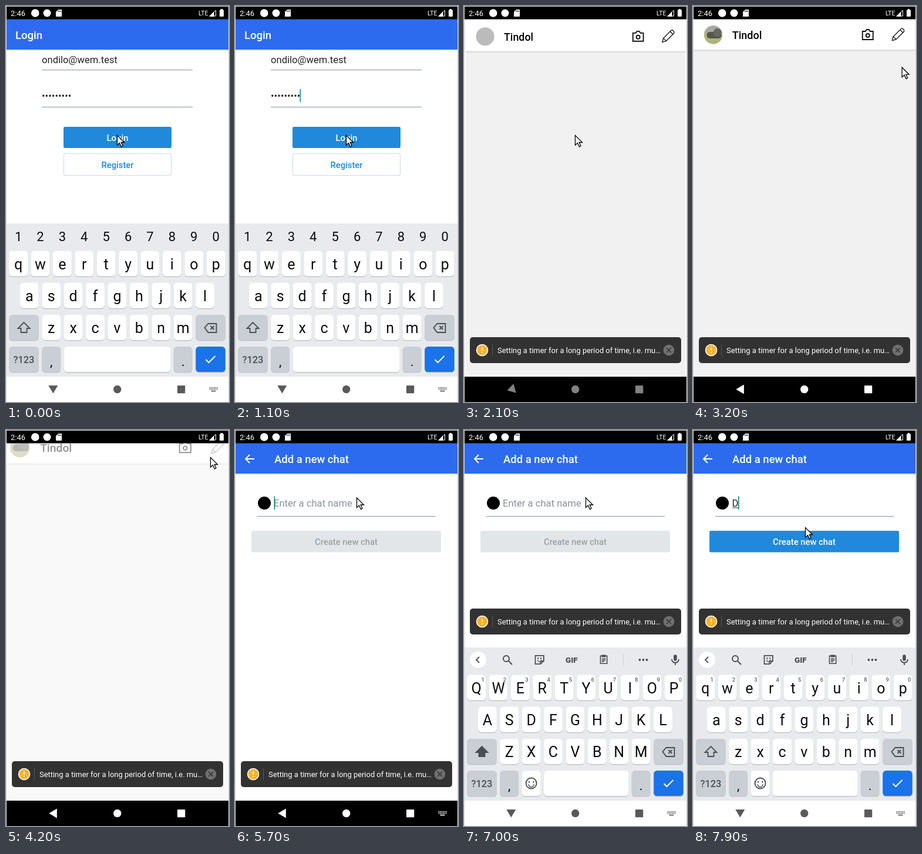
Write an HTML page with a canvas that moves like this. It is 380 px wide and 672 px high and loops after 8 s.

```html
<!DOCTYPE html>
<html lang="en">
<head>
<meta charset="utf-8">
<title>Chat app walkthrough</title>
<style>
html, body { margin: 0; width: 100%; height: 100%; overflow: hidden; background: #fff; }
canvas { display: block; }
</style>
</head>
<body>
<canvas id="stage" width="380" height="672"></canvas>
<script>
const W = 380, H = 672, LOOP = 8000, STEP = 100;
const TOP = 22, NAV = 629, MID_X = 190, MID_Y = 325;
const BLUE = '#2c6bed', BUTTON = '#2089dc', GREY = '#86939e', TEAL = '#17837c';
const TEXT = '#242424', INK = '#0c0c0d', KEY_INK = '#4a4d51', PANEL = '#e8eaed', GREY_KEY = '#caced5';
const DP = 380 / 411.4;
const stage = document.getElementById('stage').getContext('2d');
const layerCanvas = Object.assign(document.createElement('canvas'), { width: W, height: H });
const layer = layerCanvas.getContext('2d');
let ctx = stage;

const ramp = (t, from, to) => Math.min(1, Math.max(0, (t - from) / (to - from)));
const easeOut = k => 1 - (1 - k) ** 2;
const blink = t => (t + LOOP) % 1000 < 500;

function rect(x, y, w, h, color, radius = 0) {
  ctx.fillStyle = color;
  ctx.beginPath();
  ctx.roundRect(x, y, w, h, radius);
  ctx.fill();
}

function disc(x, y, r, color) {
  ctx.fillStyle = color;
  ctx.beginPath();
  ctx.arc(x, y, r, 0, Math.PI * 2);
  ctx.fill();
}

function text(str, x, y, size, color, weight = 400, align = 'left') {
  ctx.font = `${weight} ${size}px Roboto, sans-serif`;
  ctx.textAlign = align;
  ctx.fillStyle = color;
  ctx.fillText(str, x, y);
}

// Icons live on a 24 unit grid centred on (x, y).
function icon(path, x, y, color, { scale = 1, width = 2, fill, cap = 'butt' } = {}) {
  ctx.save();
  ctx.translate(x, y);
  ctx.scale(scale, scale);
  ctx.translate(-12, -12);
  const shape = new Path2D(path);
  if (fill) { ctx.fillStyle = fill; ctx.fill(shape); }
  ctx.strokeStyle = color;
  ctx.lineWidth = width;
  ctx.lineCap = cap;
  ctx.stroke(shape);
  ctx.restore();
}

function clipped(addPath, paint) {
  ctx.save();
  ctx.beginPath();
  addPath();
  ctx.clip();
  paint();
  ctx.restore();
}

function shadow(y, strength, depth) {
  const g = ctx.createLinearGradient(0, y, 0, y + depth);
  g.addColorStop(0, `rgba(0,0,0,${strength})`);
  g.addColorStop(1, 'rgba(0,0,0,0)');
  rect(0, y, W, depth, g);
}

// Paints a whole page scaled about the screen centre and faded as one group.
function blend(scale, alpha, paint) {
  if (!alpha) return;
  ctx = layer;
  ctx.clearRect(0, 0, W, H);
  ctx.save();
  ctx.translate(MID_X, MID_Y);
  ctx.scale(scale, scale);
  ctx.translate(-MID_X, -MID_Y);
  paint();
  ctx.restore();
  ctx = stage;
  ctx.globalAlpha = alpha;
  ctx.drawImage(layerCanvas, 0, 0);
  ctx.globalAlpha = 1;
}

function blueHeader(title, x) {
  rect(1, TOP, 378, NAV - TOP, '#fff');
  rect(1, TOP, 378, 52, BLUE);
  shadow(74, .14, 3);
  text(title, x, 56, 20 * DP, '#fff', 500);
}

function button(label, x, y, w, h, back, color) {
  rect(x, y, w, h, back, 2.5);
  text(label, x + w / 2, y + 24, 16 * DP, color, 500, 'center');
}

function loginPage(t) {
  blueHeader('Login', 16);
  text('ondilo@wem.test', 61, 97, 18 * DP, TEXT);
  rect(61, 108, 257, 1, GREY);
  text('•'.repeat(9), 61, 158, 18 * DP, TEXT);
  rect(61, 171, 257, 1, GREY);
  if (blink(t - 100)) rect(110.5, 141, 1.5, 22, TEAL);

  button('Login', 98, 205, 184, 36, BUTTON, '#fff');
  if (t >= 800 && t < 1100) {
    clipped(() => ctx.roundRect(98, 205, 184, 36, 2.5),
      () => disc(190, 223, 40 + (t - 800) * .35, 'rgba(0,0,0,.12)'));
  }
  rect(98, 250, 184, 38, '#cbd8f0', 3);
  button('Register', 99, 251, 182, 36, '#fff', BUTTON);
}

function avatar(loaded) {
  const x = 34.5, y = 49, r = 15.7;
  if (!loaded) return disc(x, y, r, '#bbb');
  clipped(() => ctx.arc(x, y, r, 0, Math.PI * 2), () => {
    rect(x - 16, y - 16, 32, 32, '#b1b37c');
    rect(x - 16, y - 16, 32, 12, '#a9a9a5');
    rect(x - 11, y - 5, 25, 11, '#55564f', 5);
    disc(x + 7, y - 4, 7, '#66675f');
  });
}

function homePage(t) {
  rect(1, TOP, 378, NAV - TOP, '#f1f1f1');
  rect(1, TOP, 378, 52, '#fff');
  shadow(74, .11, 4);
  avatar(t >= 2300);
  text('Tindol', 66.8, 56, 18, '#000', 500);
  icon('M3 6H8L10 3H14L16 6H21V20H3ZM15 13A3 3 0 1 1 9 13A3 3 0 1 1 15 13', 297.8, 49, '#111', { width: 1.9 });
  ctx.globalAlpha = t >= 3900 ? .5 : 1;
  icon('M2 22L4 15L18 1Q20 0 22 2T23 6L9 20ZM16 3L21 8M4 15L9 20', 349, 49, '#111', { scale: .96, width: 1.4 });
  ctx.globalAlpha = 1;
}

function chatPage(t) {
  const typed = t >= 7100, ready = t >= 7500;
  blueHeader('Add a new chat', 67);
  icon('M20 12H5M12 5L5 12L12 19', 25, 49, '#fff');
  disc(50, 124, 11, '#000');
  if (typed) {
    text('D', 66.5, 130, 18 * DP, TEXT);
    rect(67, 131.5, 10, 1, TEXT);
  } else {
    text('Enter a chat name', 66, 130, 18 * DP, GREY);
  }
  const focused = t >= 5400;
  if (typed || focused && blink(t - 5400)) rect(typed ? 77 : 66.5, 112.5, 1.6, 22.5, TEAL);
  rect(38, 146, 304, 1, GREY);
  button('Create new chat', 28, 171, 323, 36.5, ready ? BUTTON : '#e2e6e9', ready ? '#fff' : '#99a1a8');
}

function toast(t) {
  if (t < 1400) return;
  const y = t < 1700 || t >= 6400 ? 303 : 562;
  rect(10, y, 360, 44, '#323232', 5);
  disc(31, y + 22, 10.3, '#fff');
  disc(31, y + 22, 8.7, '#fab32f');
  rect(30.3, y + 17, 1.5, 6, '#fff');
  rect(30.3, y + 25, 1.5, 1.7, '#fff');
  rect(48, y + 12, 1, 20, '#575757');
  text('Setting a timer for a long period of time, i.e. mu…', 57, y + 27, 14 * DP, '#fff');
  disc(349, y + 22, 9.3, '#707070');
  icon('M8 8L16 16M16 8L8 16', 349, y + 22, '#323232', { width: 1.5 });
}

function smile(x, y, color, r) {
  for (const side of [-1, 1]) disc(x + side * r * .4, y - r * .25, 1.2, color);
  icon('M7 14A5 5 0 0 0 17 14', x, y, color, { scale: r / 10, width: 1.8 });
}

const toolbarIcons = {
  clipboard(x, y) {
    icon('M5 5H19V21H5ZM8 11H16M8 14H16M8 17H13', x, y - 1, KEY_INK, { scale: .8 });
    rect(x - 3.5, y - 8.5, 7, 4, KEY_INK, 1);
  },
  gear(x, y) {
    icon('M12 2V22M3 7L21 17M21 7L3 17', x, y, KEY_INK, { scale: .8, width: 5 });
    disc(x, y, 6.2, KEY_INK);
    disc(x, y, 2.7, PANEL);
  },
  palette(x, y) {
    disc(x, y, 8, KEY_INK);
    for (let i = 0; i < 4; i++) {
      const angle = Math.PI * (1 + i / 3);
      disc(x + 4.5 * Math.cos(angle), y + 4.5 * Math.sin(angle), 1.3, PANEL);
    }
    disc(x + 5, y + 6, 3.2, PANEL);
  },
  resize(x, y) {
    icon('M4 4H20V20H4Z', x, y, KEY_INK, { scale: .85 });
    icon('M12 12H19L12 19Z', x, y, KEY_INK, { scale: .85, fill: KEY_INK });
  },
  search(x, y) {
    icon('M15 10A5 5 0 1 1 5 10A5 5 0 1 1 15 10M14 14L20 20', x, y, KEY_INK);
  },
  sticker(x, y) {
    icon('M4 4H20V14L14 20H4ZM20 14H14V20', x, y, KEY_INK, { scale: .9 });
    smile(x, y - 1, KEY_INK, 6);
  },
  gif(x, y) {
    text('GIF', x, y + 4.5, 13.5, KEY_INK, 900, 'center');
  }
};

function toolbar(names) {
  const y = 390;
  disc(24, y + .5, 14, '#d6d8db');
  disc(24, y, 14, '#fff');
  icon('M14 7L9 12L14 17', 24, y, KEY_INK, { width: 1.8 });
  names.forEach((name, i) => toolbarIcons[name](74 + 54.7 * i, y));
  rect(271, 380, 1, 20, '#cdd0d4');
  for (let i = -1; i <= 1; i++) disc(305.5 + 6 * i, y, 1.9, KEY_INK);
  icon('M12 6V11', 360, y, KEY_INK, { width: 5.5, cap: 'round' });
  icon('M6 11A6 6 0 0 0 18 11M12 17V21', 360, y, KEY_INK, { width: 1.8 });
}

function keyboard(t) {
  const chat = t > 4000, upper = chat && t < 7800;
  const hidden = chat ? 1 - ramp(t, 5900, 6200) : ramp(t, 1500, 1700);
  if (hidden === 1) return;

  const pitch = 37.4, keyW = 31.8, wideW = 50.5;
  const column = i => 5.2 + pitch * i;
  const line = i => 415.5 + 54.2 * i;
  const key = (x, row, w = keyW, color = '#fff') => {
    rect(x, line(row) + 1, w, 43.5, '#c3c6ca', 5.5);
    rect(x, line(row), w, 43, color, 5.5);
  };
  const letter = (c, col, row) => {
    key(column(col), row);
    text(upper ? c.toUpperCase() : c, column(col) + keyW / 2, Math.round(line(row) + 31.2), 25, INK, 400, 'center');
  };

  ctx.save();
  ctx.translate(0, 300 * hidden);
  rect(1, 369, 378, 260, PANEL);
  if (chat) toolbar(t < 6500 ? ['clipboard', 'gear', 'palette', 'resize'] : ['search', 'sticker', 'gif', 'clipboard']);
  [['qwertyuiop', 0], ['asdfghjkl', .5], ['zxcvbnm', 1.5]].forEach(([row, indent], r) =>
    [...row].forEach((c, i) => letter(c, i + indent, r)));
  [...'1234567890'].forEach((n, i) => {
    const x = column(i) + keyW / 2;
    if (chat) text(n, x + 11, 426.5, 9.5, '#5f6368', 500, 'center');
    else text(n, x, 399, 22, INK, 400, 'center');
  });

  const rightX = 323.3;
  key(column(0), 2, wideW, GREY_KEY);
  icon('M12 3L2 13H7V20H17V13H22Z', 30.5, 546, KEY_INK, { width: 1.8, fill: upper && KEY_INK });
  key(rightX, 2, wideW, GREY_KEY);
  icon('M8 5H22V20H8L2 12ZM12 9L18 15M18 9L12 15', 348.5, 546, KEY_INK, { width: 1.9 });

  key(column(0), 3, wideW, GREY_KEY);
  text('?123', 30.3, 606, 16.3, KEY_INK, 500, 'center');
  [[',', 1.5], ['.', 7.5]].forEach(([mark, col]) => {
    key(column(col), 3, keyW, GREY_KEY);
    text(mark, column(col) + keyW / 2, 611, 22, INK, 400, 'center');
  });
  if (chat) {
    key(column(2.5), 3);
    icon('M21 12A9 9 0 1 1 3 12A9 9 0 1 1 21 12', 114.6, 599.5, KEY_INK, { width: 1.9 });
    smile(114.6, 599.5, KEY_INK, 9);
  }
  const space = column(chat ? 3.5 : 2.5);
  key(space, 3, 280.5 - space);
  key(rightX, 3, wideW, '#1a73e8');
  icon('M4 12L9 17L20 6', 348.5, 600, '#fff');
  ctx.restore();
}

function navBar(t) {
  const dark = t >= 1700 && t < 6000;
  const color = dark ? '#fff' : '#5a5a5a';
  const turn = ramp(t, 1600, 2200) - ramp(t, 6000, 6700);
  rect(1, NAV, 378, H - NAV, dark ? '#000' : '#fff');
  ctx.globalAlpha = t < 1700 ? 1 : dark ? ramp(t, 1600, 2300) ** 2 : ramp(t, 6170, 7000);
  ctx.save();
  ctx.translate(80.3, 650.5);
  ctx.rotate(turn * Math.PI / 2);
  ctx.fillStyle = color;
  ctx.fill(new Path2D('M-8-6.5H8L0 7Z'));
  ctx.restore();
  disc(189.7, 650.5, 6.7, color);
  rect(292, 644, 13.3, 13.3, color, 1);
  if (t < 1700 || t >= 5700) {
    for (let i = 0; i < 12; i++) rect(346.5 + i % 6 * 2.5, 647 + Math.floor(i / 6) * 2.6, 1.6, 1.6, color);
    rect(349.5, 652.6, 8, 1.7, color);
  }
  ctx.globalAlpha = 1;
}

function statusBar() {
  rect(1, 1, 378, 21.5, '#000');
  text('2:46', 8, 17, 14 * DP, '#fff');
  disc(49.7, 12, 6.8, '#fff');
  disc(70, 12, 6.5, '#fff');
  ctx.fillStyle = '#fff';
  ctx.fill(new Path2D('M89 6H95V18H85V10Z'));
  for (let i = 0; i < 3; i++) rect(88.3 + 2.1 * i, 7.5, 1, 2.5, '#000');
  text('LTE', 328, 16, 10.5, '#fff');
  clipped(() => ctx.rect(346, 5, 8.5, 14), () => {
    ctx.fillStyle = '#fff';
    ctx.fill(new Path2D('M358 6V18H346Z'));
  });
  icon('M23 7V17H13Z', 346.5, 12, '#fff', { width: 1 });
  rect(364, 6.5, 7, 11.5, '#fff', 1);
  rect(365.8, 5, 3.4, 2, '#fff');
}

function mouse(t) {
  let x = 189.5, y = 219.5;
  const glide = (from, to, endX, endY, bow = 0) => {
    const k = ramp(t, from, to);
    x += (endX - x) * k + bow * Math.sin(Math.PI * k);
    y += (endY - y) * k;
  };
  glide(2800, 3400, 348.5, 46.5, 70);
  glide(4600, 5100, 207.5, 115);
  glide(7700, 7900, 191.5, 165.5);

  ctx.save();
  ctx.translate(x, y);
  const arrow = new Path2D('M0 0V16.5L4 13L7 19.5L9.5 18L6.7 12H12Z');
  ctx.fillStyle = '#fff';
  ctx.fill(arrow);
  ctx.strokeStyle = '#000';
  ctx.lineWidth = 1.3;
  ctx.stroke(arrow);
  ctx.restore();
}

function draw(t) {
  rect(0, 0, W, H, '#fff');
  blend(1, 1 - ramp(t, 1900, 2110), () => loginPage(t));
  const enter = easeOut(ramp(t, 1700, 2240)), leave = ramp(t, 4000, 4200);
  const homeScale = .85 + .15 * enter + .07 * easeOut(leave);
  blend(homeScale, ramp(t, 1700, 2100) - .58 * leave, () => homePage(t));
  blend(1, ramp(t, 4300, 4500), () => chatPage(t));
  toast(t);
  keyboard(t);
  navBar(t);
  statusBar();
  mouse(t);
  rect(0, 0, W, 1, '#dadada');
  rect(0, 0, 1, H, '#dadada');
  rect(W - 1, 0, 1, H, '#dadada');
}

const start = performance.now();
function tick() {
  const t = (performance.now() - start) % LOOP;
  draw(Math.floor(t / STEP) * STEP);
  requestAnimationFrame(tick);
}
tick();
</script>
</body>
</html>
```
